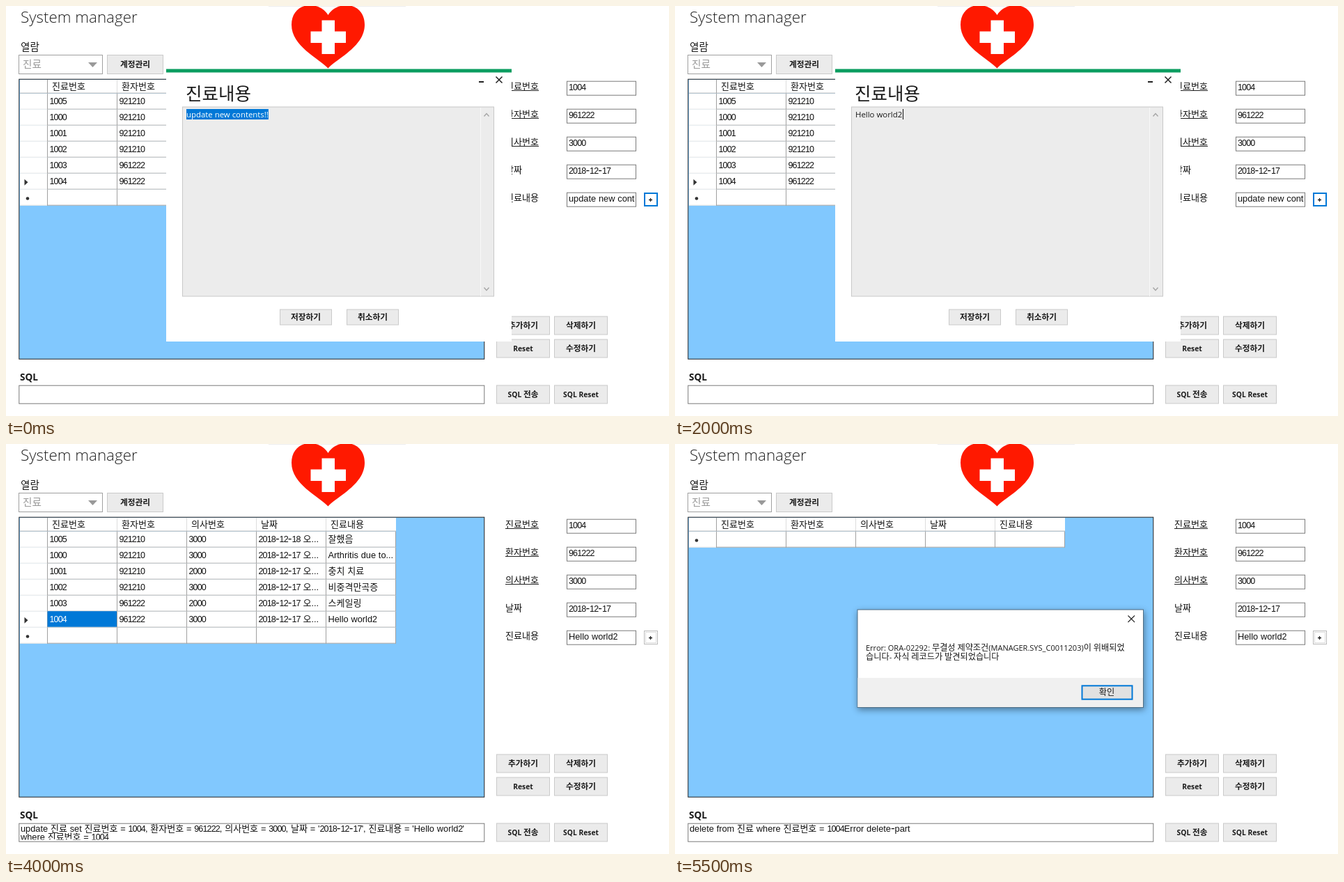
Animation, 952 px wide and 589 px high, one loop 6000 ms. Source, as an HTML page:

```html
<!DOCTYPE html>
<html lang="ko">
<head>
<meta charset="utf-8">
<title>System manager</title>
<style>
html, body { margin: 0; width: 100%; height: 100%; overflow: hidden; background: #fff; }
svg { display: block; }
text { font: 11px "Open Sans", "Noto Sans CJK KR", sans-serif; fill: #1a1a1a; white-space: pre; }
.h { font-family: "Noto Sans CJK KR", "Noto Sans CJK", sans-serif; font-size: 12.2px; }
/* form text: narrow digits, wide Hangul */
.g { font: 12.8px "Liberation Sans", Arial, sans-serif; fill: #111; word-spacing: .25px; }
.g .h { font-size: 13px; }
.g .d { font-size: 12.5px; letter-spacing: -.85px; }
.g .m { font-size: 17px; }
.b { font-size: 10.3px; font-weight: 700; text-anchor: middle; }
.b .h { font-size: 11.7px; }
.title { font-size: 22.4px; font-weight: 300; fill: #222; }
.head { font-size: 13.6px; font-weight: 700; }
.lab .h { font-size: 14.6px; }
.big .h { font-size: 25.5px; }
.edit { font-size: 11.4px; }
.mid { text-anchor: middle; }
</style>
</head>
<body>
<svg id="stage" width="952" height="589" viewBox="0 0 952 589"></svg>
<script>
const stage = document.getElementById('stage');
const BLUE = '#0078d7', STEP = 500, STEPS = 12;
const OLD = 'update new contents!!', NEW = 'Hello world2';
const TYPED = [0, 0, 4, 8, 12];
const HEADS = ['진료번호', '환자번호', '의사번호', '날짜', '진료내용'];
const ROWS = [
  ['1005', '921210', '3000', '2018-12-18 오...', '잘했음'],
  ['1000', '921210', '3000', '2018-12-17 오...', 'Arthritis due to...'],
  ['1001', '921210', '2000', '2018-12-17 오...', '충치 치료'],
  ['1002', '921210', '3000', '2018-12-17 오...', '비중격만곡증'],
  ['1003', '961222', '2000', '2018-12-17 오...', '스케일링'],
  ['1004', '961222', '3000', '2018-12-17 오...']
];

const runClass = s => /[가-힣]/.test(s) ? 'h' : /\d/.test(s) ? 'd' : s === '-' ? 'm' : 'l';
const text = (x, y, s, cls = '', attrs = '') => `<text x="${x}" y="${y}" class="${cls}" ${attrs}>` +
  s.match(/[가-힣]+|\d+|-|[^가-힣\d-]+/g).map(r => `<tspan class="${runClass(r)}">${r}</tspan>`).join('') + '</text>';
const rect = (x, y, w, h, fill, attrs = '') =>
  `<rect x="${x}" y="${y}" width="${w}" height="${h}" fill="${fill}" ${attrs}/>`;
const frame = (x, y, w, h, fill, line, lw = 1) =>
  rect(x + lw / 2, y + lw / 2, w - lw, h - lw, fill, `stroke="${line}" stroke-width="${lw}"`);
const path = (d, fill, line = 'none', lw = 1) =>
  `<path d="${d}" fill="${fill}" stroke="${line}" stroke-width="${lw}"/>`;
const button = (x, y, w, h, s, hot) =>
  frame(x, y, w, h, hot ? '#666' : '#ebebeb', hot ? '#555' : '#cacaca') +
  text(x + w / 2, y + h / 2 + 4, s, 'b', hot ? 'style="fill:#ddd"' : '');

function header() {
  return rect(377, 0, 197, 1, '#eee') +
    text(21, 24, 'System manager', 'title') +
    path('M462.5 89.5C449 75 410 58 410 27C410 10 421 -1 436 -1C448 -1 457 4 462.5 13C468 4 477 -1 489 -1C504 -1 515 10 515 27C515 58 476 75 462.5 89.5Z', '#ff1900') +
    path('M453.5 20.5h18.5v16h16v16.5h-16v16h-18.5v-16h-16v-16.5h16z', '#fff') +
    text(21, 64, '열람', 'lab') +
    frame(18, 70, 121, 28, '#fff', '#a0a0a0') +
    text(24, 89, '진료', 'lab', 'style="fill:#999"') +
    path('M118 81h13l-6.5 7z', '#999') +
    button(145, 70, 81, 28, '계정관리');
}

function table(rows, selRow, selCol) {
  let s = frame(18.3, 104.7, 669, 403, '#81c8fe', '#222');
  s += rect(20, 106, 540, 19, '#fff');
  HEADS.forEach((name, i) => s += text(66 + i * 100, 119.5, name, 'g') +
    rect(59 + i * 100, 106, 1, 19, i ? '#ddd' : '#a0a0a0'));
  s += rect(20, 124.7, 540, 1, '#a0a0a0');
  for (let r = 0; r <= rows.length; r++) {
    const y = 125.7 + r * 23, row = rows[r];
    s += rect(20, y, 540, 23, '#fff') + rect(20, y + 22, 39, 1, '#e2e2e2') + rect(59, y + 22, 501, 1, '#a0a0a0');
    for (let c = 0; c < 6; c++) s += rect(59 + c * 100, y, 1, 23, '#a0a0a0');
    for (let c = 0; row && c < 5; c++) {
      const x = 60 + c * 100, on = r === selRow && c === selCol;
      if (on) s += rect(x - .5, y - .5, 99.5, 22.5, BLUE);
      s += text(x + 2.5, y + 14.8, row[c], 'g', on ? 'style="fill:#fff"' : '');
    }
    if (!row) s += `<circle cx="31" cy="${y + 12.8}" r="2.3" fill="#333"/>`;
    else if (r === selRow) s += path(`M26.5 ${y + 8}l5 4.5l-5 4.5z`, '#333');
  }
  return s;
}

function form(note, focus, hot) {
  let s = '';
  ['1004', '961222', '3000', '2018-12-17', note].forEach((value, i) => {
    const y = 108 + i * 40;
    s += text(717, y + 11.5, HEADS[i], 'g');
    if (i < 3) s += rect(717, y + 13, 48, 1, '#222');
    s += frame(805, y - .3, 100, 21, '#fff', '#7a7a7a') + text(808, y + 13, value, 'g');
  });
  s += frame(916, 268, 20, 20, '#fff', focus ? BLUE : '#bbb', focus ? 2 : 1) +
    (focus ? '' : frame(918, 270, 16, 16, '#fff', '#ddd')) +
    path('M923 278.5h5M925.5 276v5', 'none', '#222', 1.3);
  [['추가하기', '삭제하기'], ['Reset', '수정하기'], ['SQL 전송', 'SQL Reset']].forEach((pair, r) =>
    pair.forEach((name, c) => s += button(704 + c * 83, [445.5, 478.5, 544.5][r], 77, 27, name, hot && name === '삭제하기')));
  return s;
}

function sqlBox(lines) {
  return text(20, 538, 'SQL', 'head') + frame(18.3, 544.7, 669, 27, '#fff', '#7a7a7a') +
    '<clipPath id="box"><path d="M19 546h667v22.5h-667z"/></clipPath><g clip-path="url(#box)">' +
    lines.map((line, i) => text(21, 557.3 + i * 12, line, 'g')).join('') + '</g>';
}

function editor(count) {
  return rect(230, 91, 496, 391, '#fff') + rect(230, 90.5, 496, 5, '#0b9d60') +
    text(258, 135, '진료내용', 'big') +
    rect(679, 108, 7, 2, '#222') + path('M703.5 101.5l9 9m0 -9l-9 9', 'none', '#222', 1.5) +
    frame(253, 144.5, 448, 273, '#ececec', '#c8c8c8') + rect(681, 146, 1, 271, '#f8f8f8') +
    path('M686.5 158.5l3.5 -4l3.5 4M686.5 404.5l3.5 4l3.5 -4', 'none', '#a5a5a5', 1.4) +
    rect(259, 148, 1, 15, count ? '#111' : BLUE, 'id="mark"') +
    text(259, 159.5, count ? NEW.slice(0, count) : OLD, 'edit', `id="note" ${count ? '' : 'style="fill:#fff"'}`) +
    button(393, 435.5, 75, 23, '저장하기') + button(489, 435.5, 75, 23, '취소하기');
}

function alertBox() {
  return '<g style="filter:drop-shadow(1px 3px 5px #0006)">' + frame(261.5, 237.5, 411.5, 141.5, '#fff', '#4f6f86') + '</g>' +
    rect(262.5, 336, 409.5, 42, '#f0f0f0') +
    path('M650.5 246.5l9.5 9.5m0 -9.5l-9.5 9.5', 'none', '#222', 1.1) +
    text(274, 297, 'Error: ORA-02292: 무결성 제약조건(MANAGER.SYS_C0011203)이 위배되었') +
    text(274, 310, '습니다- 자식 레코드가 발견되었습니다') +
    frame(583.5, 346.3, 74, 21.4, '#e1e1e1', BLUE, 2) + text(620, 361, '확인', 'mid');
}

function draw(k) {
  const editing = k < 5, saved = k > 5, failed = k > 9;
  const [selRow, selCol] = !saved ? [5, 4] : k < 8 ? [0, 0] : [5, 0];
  const rows = ROWS.map((row, i) => i < 5 ? row : [...row, saved ? NEW : 'update new c...']);
  const sql = failed ? ['delete from 진료 where 진료번호 = 1004Error delete-part'] : saved ? [
    `update 진료 set 진료번호 = 1004, 환자번호 = 961222, 의사번호 = 3000, 날짜 = '2018-12-17', 진료내용 = '${NEW}'`,
    'where 진료번호 = 1004'] : [];
  stage.innerHTML = header() + table(failed ? [] : rows, selRow, selCol) +
    form(editing ? 'update new cont' : NEW, !saved, k === 9) + sqlBox(sql) +
    (editing ? editor(TYPED[k]) : '') + (failed ? alertBox() : '');
  if (editing) {
    const mark = document.getElementById('mark');
    const width = document.getElementById('note').getComputedTextLength();
    if (TYPED[k]) mark.setAttribute('x', Math.round(259.5 + width));
    else mark.setAttribute('width', width);
  }
}

let shown = -1;
function tick() {
  const k = Math.floor(performance.now() / STEP) % STEPS;
  if (k !== shown) draw(shown = k);
  requestAnimationFrame(tick);
}
tick();
</script>
</body>
</html>
```
